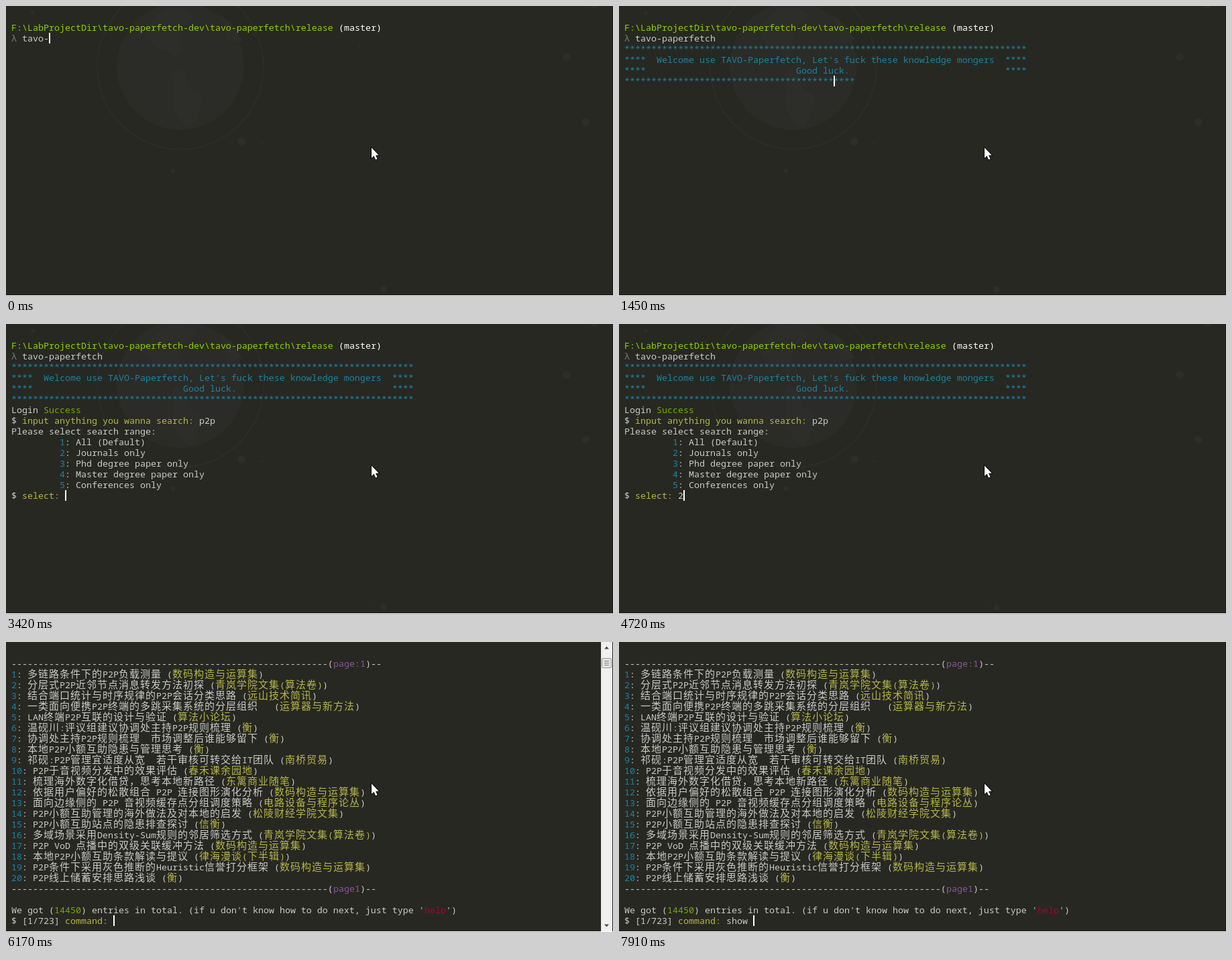
Animation, 905 px wide and 433 px high, one loop 8 s. Source, as an HTML page:

```html
<!DOCTYPE html>
<html lang="en">
<head>
<meta charset="utf-8">
<title>Terminal search</title>
<style>
  html, body { margin: 0; width: 100%; height: 100%; overflow: hidden; background: #272822; }
  svg { display: block; width: 100%; height: 100%; }
  text { white-space: pre; font: 13.3333px "Noto Sans Mono", monospace; }
  text.cjk { font: 15px "Noto Sans CJK SC", "Noto Sans CJK", sans-serif; letter-spacing: 1px; }
</style>
</head>
<body>
<svg viewBox="0 0 905 433">
  <rect width="905" height="433" fill="#272822"/>
  <g id="wallpaper" fill="#2d2d29">
    <circle cx="260" cy="90" r="95" fill="#2b2b27"/>
    <circle cx="260" cy="90" r="124" fill="none" stroke="#2c2d28" stroke-width="2"/>
    <path d="M212 28L236 4H268L284 14L262 34L258 56L264 62L252 80L240 66L222 62L212 46Z"/>
    <path d="M252 92L268 100L274 124L292 134L288 160L276 182L262 174L248 152L250 124L246 104Z"/>
    <path d="M318 12L340 30L352 52L332 54L326 36Z"/>
    <g id="dots"></g>
  </g>
  <g id="lines"></g>
  <rect id="cursor" width="2" height="16" fill="#fff"/>
  <g id="scrollbar">
    <rect x="887" width="17" height="432" fill="#f0f0f0"/>
    <path d="M887.5 0V432" stroke="#e3e3e3"/>
    <rect x="888.5" y="24.5" width="14" height="14" rx="1.5" fill="#e4e4e6" stroke="#979797"/>
    <path d="M892 28.5h7M892 31.5h7M892 34.5h7" stroke="#7a7a7a"/>
    <path d="M892 10.5l3.5-4 3.5 4zM892 421.5l3.5 4 3.5-4z" fill="#505050"/>
  </g>
  <path d="M904.5 0V432" stroke="#191a17"/>
  <rect y="432" width="905" height="1" fill="#fff"/>
  <path d="M545 211.5v15.5l3.5-3.2 2.6 5.6 2.5-1.1-2.5-5.5h4.6z"
    fill="#fff" stroke="#000" stroke-width="1.6" paint-order="stroke"/>
</svg>
<script>
const LOOP = 8000, COL = 8, ROW = 16, LEFT = 8, TOP = 24;
const COLORS = {
  w: "#cacaca", W: "#ffffff", k: "#7c7c7c", g: "#74aa04", G: "#8dd006",
  c: "#1a83a6", y: "#b6b649", m: "#89569c", r: "#a70334"
};
const $ = id => document.getElementById(id);
const isWide = s => /[\u3000-\uffff]/.test(s);
const stars = "*".repeat(75), dashes = "-".repeat(59);

// Each line is [fixed markup, typed text, typed colour]; "^x" switches colour.
const menu = ["All (Default)", "Journals only", "Phd degree paper only",
  "Master degree paper only", "Conferences only"];
const shell = [
  ["^GF:\\LabProjectDir\\tavo-paperfetch-dev\\tavo-paperfetch\\release ^W(master)"],
  ["^kλ ", "tavo-paperfetch"],
  ["^c" + stars],
  ["^c****  Welcome use TAVO-Paperfetch, Let's fuck these knowledge mongers  ****"],
  ["^c****" + " ".repeat(28) + "Good luck." + " ".repeat(29) + "****"],
  ["", stars, "c"],
  ["^wLogin ^gSuccess"],
  ["^w$ ^yinput anything you wanna search: ", "p2p"],
  ["^wPlease select search range:"],
  ...menu.map((name, i) => [`^c${" ".repeat(9)}${i + 1}^w: ${name}`]),
  ["^w$ ^yselect: ", "2"]
];

const papers = [
  "多链路条件下的P2P负载测量|数码构造与运算集",
  "分层式P2P近邻节点消息转发方法初探|青岚学院文集(算法卷)",
  "结合端口统计与时序规律的P2P会话分类思路|远山技术简讯",
  "一类面向便携P2P终端的多跳采集系统的分层组织\u3000|运算器与新方法",
  "LAN终端P2P互联的设计与验证|算法小论坛",
  "温砚川:评议组建议协调处主持P2P规则梳理|衡",
  "协调处主持P2P规则梳理\u3000市场调整后谁能够留下|衡",
  "本地P2P小额互助隐患与管理思考|衡",
  "祁砚:P2P管理宜适度从宽\u3000若干审核可转交给IT团队|南桥贸易",
  "P2P于音视频分发中的效果评估|春禾课余园地",
  "梳理海外数字化借贷，思考本地新路径|东篱商业随笔",
  "依据用户偏好的松散组合 P2P 连接图形演化分析|数码构造与运算集",
  "面向边缘侧的 P2P 音视频缓存点分组调度策略|电路设备与程序论丛",
  "P2P小额互助管理的海外做法及对本地的启发|松陵财经学院文集",
  "P2P小额互助站点的隐患排查探讨|信衡",
  "多域场景采用Density-Sum规则的邻居筛选方式|青岚学院文集(算法卷)",
  "P2P VoD 点播中的双级关联缓冲方法|数码构造与运算集",
  "本地P2P小额互助条款解读与提议|律海漫谈(下半辑)",
  "P2P条件下采用灰色推断的Heuristic信誉打分框架|数码构造与运算集",
  "P2P线上储蓄安排思路浅谈|衡"
];
const results = [
  [`^w${dashes}(^mpage:1^w)--`],
  ...papers.map((paper, i) => {
    const [title, journal] = paper.split("|");
    return [`^c${i + 1}^w: ${title} (^y${journal}^w)`];
  }),
  [`^w${dashes}(^mpage1^w)--`],
  [""],
  ["^wWe got (^g14450^w) entries in total. (if u don't know how to do next, just type '^rhelp^w')"],
  ["^w$ [1/723] ^ycommand: ", "show "]
];

// [time, visible rows, typed characters, cursor shift]
// NEXT puts the cursor on a new row, OFF hides it.
const NEXT = -1, OFF = null;
const shellSteps = [
  [0, 2, 5], [150, 2, 6], [420, 2, 7], [540, 2, 8], [660, 2, 10],
  [810, 2, 12], [960, 2, 13], [1210, 2, 15], [1330, 2, NEXT],
  [1450, 6, 43, -4], [1570, 6, NEXT], [1720, 8, 0], [2340, 8, 0, OFF],
  [2770, 8, 1], [3020, 8, 2], [3140, 8, 3], [3420, 15, 0],
  [3980, 15, 0, OFF], [4410, 15, 0], [4720, 15, 1], [5150, 15, 1, OFF],
  [5710, 15, NEXT]
];
const resultSteps = [
  [6170, 25, 0], [6790, 25, 0, OFF], [6940, 25, 1], [7090, 25, 2],
  [7210, 25, 3], [7360, 25, 4], [7760, 25, 4, OFF], [7910, 25, 5]
];
const steps = [...shellSteps, ...resultSteps];
const RESULTS_AT = 6170, BAR_HIDES_AT = 7210;

// Returns the SVG of one row and the column where it ends.
function layout(markup, row) {
  let col = 0, svg = "";
  for (const part of markup.split("^").slice(1)) {
    const runs = part.slice(1).match(/[\u3000-\uffff]+|[^\u3000-\uffff]+/g) || [];
    for (const run of runs) {
      const wide = isWide(run);
      svg += `<text x="${LEFT + col * COL}" y="${TOP + row * ROW + 13}" ` +
        `fill="${COLORS[part[0]]}"${wide ? ' class="cjk"' : ""}>${run}</text>`;
      col += run.length * (wide ? 2 : 1);
    }
  }
  return { svg, col };
}

function draw([time, rows, typed, shift = 0]) {
  const onResults = time >= RESULTS_AT;
  const screen = onResults ? results : shell;
  const newRow = typed === NEXT;
  let svg = "", col = 0;
  screen.slice(0, rows).forEach(([fixed, input = "", color = "w"], row) => {
    const typing = row === rows - 1 && !newRow;
    const line = layout(`${fixed}^${color}${typing ? input.slice(0, typed) : input}`, row);
    svg += line.svg;
    col = line.col;
  });
  $("lines").innerHTML = svg;
  $("cursor").setAttribute("x", LEFT + (newRow ? 0 : col + shift) * COL);
  $("cursor").setAttribute("y", TOP + (newRow ? rows : rows - 1) * ROW);
  $("cursor").style.display = shift === OFF ? "none" : "";
  $("wallpaper").style.display = onResults ? "none" : "";
  $("scrollbar").style.display = onResults && time < BAR_HIDES_AT ? "" : "none";
}

$("dots").innerHTML = [
  [836, 76, 6], [864, 173, 6], [351, 202, 6], [381, 205, 2], [249, 246, 3.5],
  [563, 423, 5], [548, 421, 1.5], [527, 59, 2], [40, 10, 3], [877, -2, 6]
].map(([x, y, r]) => `<circle cx="${x}" cy="${y}" r="${r}"/>`).join("");

let shown;
function tick() {
  const t = performance.now() % LOOP;
  const step = steps.filter(s => s[0] <= t).pop();
  if (step !== shown) draw(shown = step);
  requestAnimationFrame(tick);
}
tick();
</script>
</body>
</html>
```
